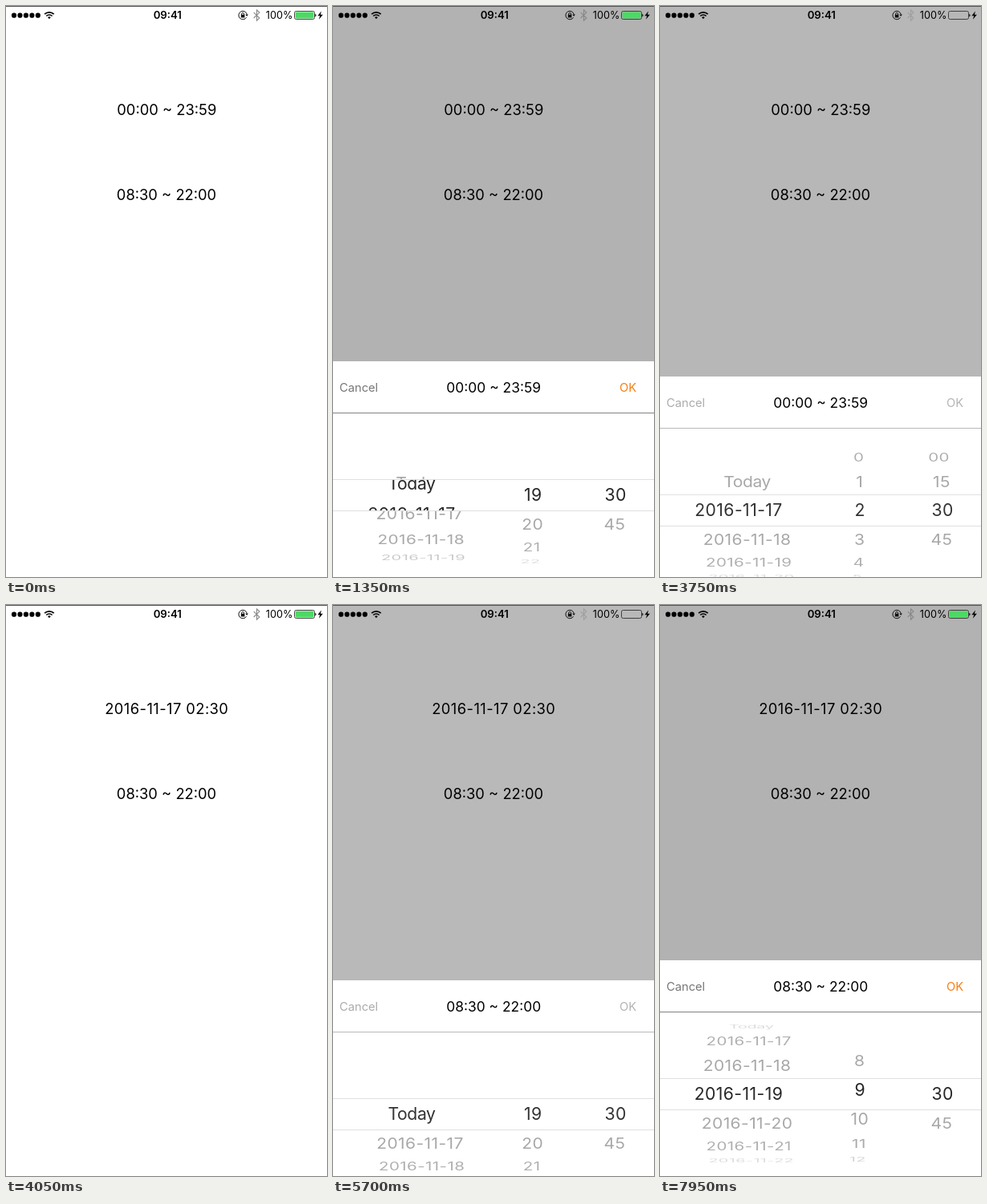
An HTML page for the animation above (8 s loop, 400x712 px).

```html
<!DOCTYPE html>
<html lang="en">
<head>
<meta charset="utf-8">
<title>Date and time picker</title>
<style>
  html, body { margin: 0; width: 100%; height: 100%; overflow: hidden; background: #fff; }
  svg { display: block; width: 400px; height: 712px; font-family: Inter, Roboto, sans-serif; }
  .mid { text-anchor: middle; }
  .home { font-size: 18.35px; }
  .date { letter-spacing: .42px; }
  .title { font-size: 17.4px; }
  .button { font-size: 14.7px; }
  .wheel { font-size: 21.2px; letter-spacing: .42px; }
  .word { letter-spacing: -.4px; }
  .status { font-size: 12.7px; }
  .clock { font-size: 13.2px; font-weight: 600; }
  #cancel { fill: #777; }
  #ok { fill: #f77f12; }
  #rule { fill: #828282; }
  #charge { fill: #4cd964; }
  #picked { fill: #262626; }
  .faded #cancel { fill: #acacac; }
  .faded #ok { fill: #b4b4b4; }
  .faded #rule { fill: #b8b8b8; }
  .faded #charge { fill: none; }
  .faded #bt { opacity: .5; }
  .faded #picked { fill: #333; }
</style>
</head>
<body>
<svg id="stage" viewBox="0 0 400 712">
  <defs>
    <clipPath id="band"><rect y="148" width="400" height="38"/></clipPath>
    <clipPath id="around"><path d="M0 76H400V147H0ZM0 187H400V256H0Z"/></clipPath>
  </defs>

  <rect width="400" height="712" fill="#fff"/>
  <text id="first" class="home mid" x="200.3" y="135.6"></text>
  <text class="home mid" x="200" y="242.4">08:30 ~ 22:00</text>
  <rect id="dim" width="400" height="712"/>

  <g id="panel">
    <rect width="400" height="269" fill="#fff"/>
    <text id="cancel" class="button" x="8" y="38">Cancel</text>
    <text id="title" class="title mid" x="200.2" y="39"></text>
    <text id="ok" class="button" x="357" y="38">OK</text>
    <rect id="rule" y="64" width="400" height="1"/>
    <path d="M0 147.5H400M0 186.5H400" stroke="#e0e0e0"/>
    <g id="rows" clip-path="url(#around)" fill="#a8a8a8"></g>
    <g id="picked" clip-path="url(#band)"></g>
  </g>

  <rect width="400" height="1" fill="#555"/>
  <path d="M10 11.7h30" stroke="#000" stroke-width="6.2" stroke-linecap="round" stroke-dasharray="0 7.45"/>
  <g fill="none" stroke="#000" stroke-width="1.7">
    <path d="M48.1 10.2a8.4 8.4 0 0 1 11.6 0M50.2 12.5a5.3 5.3 0 0 1 7.4 0"/>
    <path d="M52 14.1a2.8 2.8 0 0 1 3.8 0L53.9 16.2Z" fill="#000" stroke="none"/>
  </g>
  <text class="clock mid" x="201.3" y="16.3">09:41</text>
  <g fill="none" stroke="#111">
    <path d="M299.6 14.2A5.2 5.2 0 1 1 300.2 10.4"/>
    <path d="M293.6 11V10a1.5 1.5 0 0 1 3 0v1" stroke-width=".9"/>
    <path d="M292.8 10.8h4.6v3.6h-4.6ZM298.3 10.6h3.6l-1.8 2.3Z" fill="#111" stroke="none"/>
  </g>
  <path id="bt" d="M308.7 8.2l7.2 6.8-3.4 3.2V5l3.4 3.1-7.2 6.9" fill="none" stroke="#888" stroke-width="1.1"/>
  <text class="status" x="323.8" y="16.2">100%</text>
  <rect x="359.5" y="6.5" width="25" height="10" rx="2" fill="none" stroke="#333" stroke-width=".9"/>
  <rect id="charge" x="360.6" y="7.6" width="22.8" height="7.8" rx="1"/>
  <path d="M385.3 9.7a2 2 0 0 1 0 3.7ZM393 6.5l-4.7 5.8h2.9l-1.3 4.4 5-6h-3Z"/>
</svg>

<script>
const LOOP = 8000, STEP = 150, REOPEN = 5000;
const PANEL = 269, TOP = 443, MIDDLE = 166.5;
const RADIUS = 86.8, ROW_ANGLE = 24.5 * Math.PI / 180;
const $ = id => document.getElementById(id);

const clamp = x => Math.max(0, Math.min(1, x));
const span = (t, start, length) => clamp((t - start) / length);
const smooth = x => x * x * (3 - 2 * x);
const glide = x => 1 - (1 - x) * (1 - x);
const range = (from, to) =>
  Array.from({ length: to - from + 1 }, (_, i) => String(from + i));

const dates = ['Today', ...range(17, 26).map(d => '2016-11-' + d)];
const quarters = ['00', '15', '30', '45'];
const lateHours = range(19, 23), lateQuarters = quarters.slice(2);

// start, length, rows travelled
const spins = {
  dateA: [1250, 470, 1],
  hourA: [1850, 530, 2],
  minuteA: [2450, 540, 2],
  dateB: [6200, 970, 3],
  hourB: [7720, 660, 2]
};
const spin = (name, t) => {
  const [start, length, rows] = spins[name];
  return rows * glide(span(t, start, length));
};

function openness(t) {
  return t < REOPEN
    ? smooth(span(t, 47, 300)) - smooth(span(t, 3701, 300))
    : smooth(span(t, 5456, 300));
}

// each column: labels, position, x when picked, x on the wheel
function columns(t) {
  if (t < REOPEN) {
    const late = t < 1800;
    return [
      [dates, spin('dateA', t), 98, 107.8],
      [late ? lateHours : range(0, 23), spin('hourA', t), 249.2, 249.2],
      [late ? lateQuarters : quarters, spin('minuteA', t), 352.2, 352.2]
    ];
  }
  return [
    [dates, spin('dateB', t), 98, 107.8],
    [t < 7200 ? lateHours : range(8, 22), spin('hourB', t), 249.2, 249.2],
    [lateQuarters, 0, 352.2, 352.2]
  ];
}

function wheel([items, position, pickedX, x]) {
  let rows = '', picked = '';
  items.forEach((label, i) => {
    const offset = i - position;
    if (Math.abs(offset) > 3.4) return;
    const angle = offset * ROW_ANGLE, squash = Math.cos(angle);
    const y = MIDDLE + RADIUS * Math.sin(angle);
    const zoom = 1 - .09 * (1 - squash);
    const kind = label === 'Today' ? 'wheel mid word' : 'wheel mid';
    const text = (cx, alpha) =>
      `<text class="${kind}" y="7.7" opacity="${alpha}" transform="matrix(${zoom} 0 0 ${squash} ${cx} ${y})">${label}</text>`;
    rows += text(200 + (x - 200) * zoom, clamp(squash * 1.4));
    if (Math.abs(offset) < 1) picked += text(pickedX, 1);
  });
  return { rows, picked };
}

function draw(t) {
  const open = openness(t);
  const chosen = t >= 4050;
  $('first').textContent = chosen ? '2016-11-17 02:30' : '00:00 ~ 23:59';
  $('first').classList.toggle('date', chosen);
  $('title').textContent = t < REOPEN ? '00:00 ~ 23:59' : '08:30 ~ 22:00';
  $('dim').setAttribute('opacity', .302 * open);
  $('panel').setAttribute('transform',
    `translate(0 ${TOP + Math.round(PANEL * (1 - open))})`);
  $('stage').classList.toggle('faded', open > 0 && open < 1);

  const wheels = columns(t).map(wheel);
  $('rows').innerHTML = wheels.map(w => w.rows).join('');
  $('picked').innerHTML = wheels.map(w => w.picked).join('');
}

const begin = performance.now();
let shown = -1;
function tick() {
  const t = (performance.now() - begin) % LOOP;
  const step = Math.floor(t / STEP);
  if (step !== shown) {
    shown = step;
    draw(step * STEP);
  }
  requestAnimationFrame(tick);
}
tick();
</script>
</body>
</html>
```
